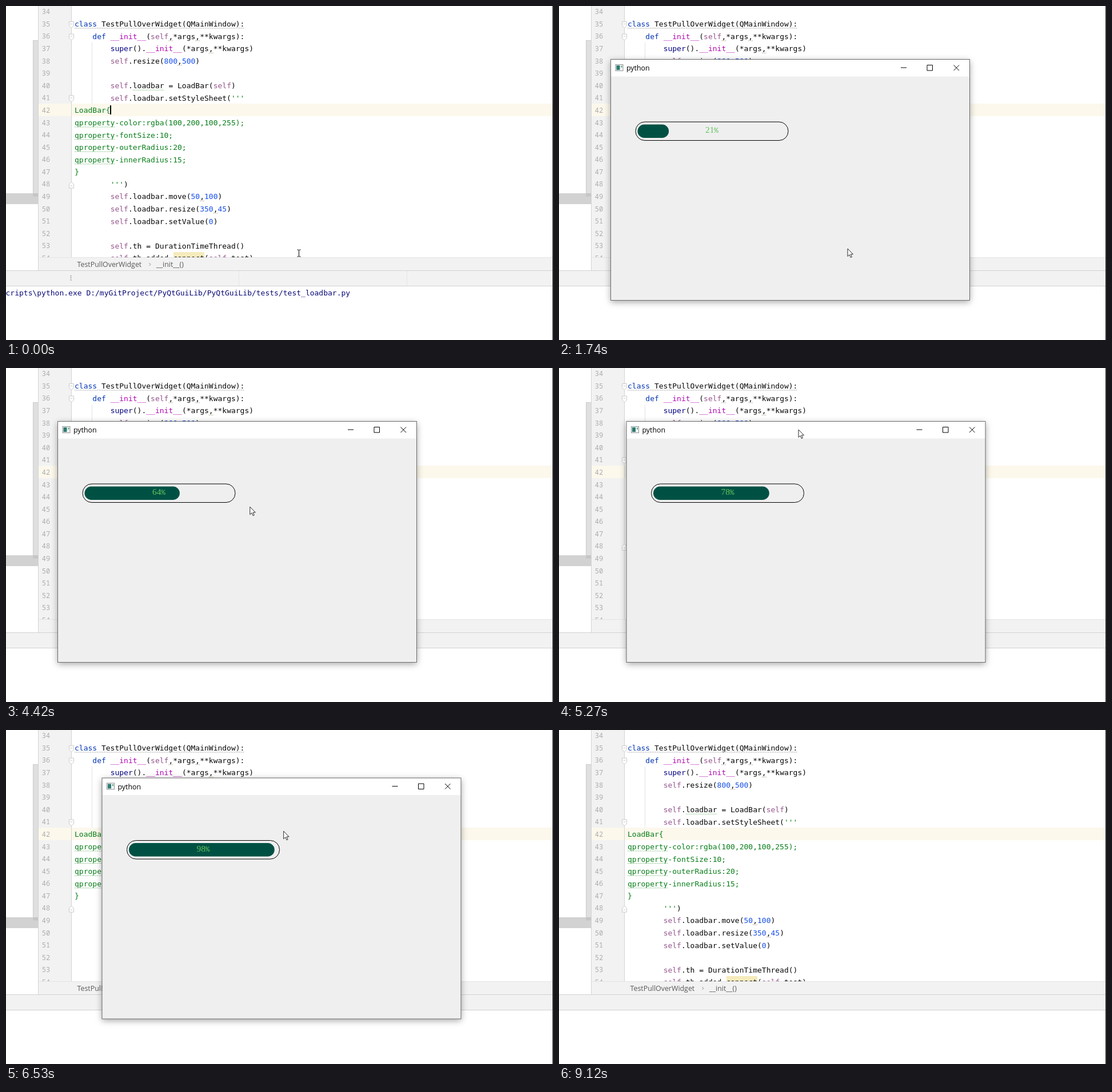
An HTML page for the animation above (9.36 s loop, 957 by 585 pixels).

```html
<!DOCTYPE html>
<html lang="en">
<head>
<meta charset="utf-8">
<title>Load bar</title>
<style>
  html, body { margin: 0; width: 100%; height: 100%; overflow: hidden; background: #fff; }
  svg { display: block; width: 957px; height: 585px; }
  text { white-space: pre; }
  .mono { font: 13px "DejaVu Sans Mono", monospace; font-variant-ligatures: none; fill: #080808; }
  .ui { font: 12.4px "Open Sans", sans-serif; }
  .number { font: 12px "Noto Sans Mono", monospace; fill: #adadad; }
  .key { fill: #0033b3; }
  .magic { fill: #b200b2; }
  .builtin { fill: #000080; }
  .self { fill: #94558d; }
  .digit { fill: #1750eb; }
  .string { fill: #067d17; }
  .line { fill: none; stroke: #000; }
  #percent { font: 15.4px "Liberation Serif", serif; fill: #64c45c; text-anchor: middle; }
  #percent .sign { font: 12.8px "Liberation Mono", monospace; }
  #shell { filter: drop-shadow(0 3px 6px rgba(0, 0, 0, .36)); }
</style>
</head>
<body>
<svg viewBox="0 0 957 585">
  <rect width="957" height="585" fill="#fff"/>
  <rect y="328" width="56" height="19" fill="#d2d2d2"/>
  <rect x="47.5" y="60.5" width="9" height="273" fill="#b4b4b4" fill-opacity=".42" stroke="#cbcbcb"/>
  <rect x="57" width="57" height="440" fill="#f2f2f2"/>
  <rect x="57" y="171" width="899" height="22" fill="#fcf8ec"/>
  <path d="M56.5 0V463M114.5 0V440" stroke="#d4d4d4"/>
  <path d="M150.5 64V171" stroke="#e4e4e4"/>
  <rect x="293" y="431" width="54" height="12" fill="#f6ebbc"/>
  <g id="code"></g>
  <path id="caret" d="M183 174V190" stroke="#000" stroke-width="2"/>

  <rect x="57" y="440" width="900" height="23" fill="#f2f2f2"/>
  <path d="M57 440.5H957" stroke="#e4e4e4"/>
  <rect y="464" width="957" height="26" fill="#f2f2f2"/>
  <path d="M0 463.5H957M0 490.5H957" stroke="#d1d1d1"/>
  <g class="ui" fill="#595959">
    <text x="124.500" y="456.500">TestPullOverWidget</text>
    <text x="263" y="456.500">__init__()</text>
    <path d="M250.500 450l2.500 2.500-2.500 2.500" class="line" style="stroke:#8c8c8c"/>
  </g>
  <g id="console">
    <path d="M407.500 464V490M701.500 464V490" stroke="#e6e6e6"/>
    <path d="M113.500 472V481" stroke="#6e6e6e" stroke-width="1.500" stroke-dasharray="1.500 2"/>
    <text class="mono" x="-.500" y="507" style="fill:#0a0a78">cripts\python.exe D:/myGitProject/PyQtGuiLib/PyQtGuiLib/tests/test_loadbar.py</text>
  </g>
  <path d="M956.500 0V585" stroke="#333"/>

  <g id="window">
    <rect id="shell" width="628" height="422" fill="#efefef"/>
    <rect width="628" height="30" fill="#fff"/>
    <rect id="hover" x="582" width="46" height="30" fill="#e81123"/>
    <rect width="628" height="422" class="line" style="stroke:#6c6c6c"/>
    <rect x="8.500" y="9" width="13" height="11" fill="#f4f6f6" stroke="#8b9296"/>
    <rect x="10" y="10.500" width="6" height="8" fill="#2d7a70"/>
    <rect x="18" y="11" width="2" height="3" fill="#5aa06e"/>
    <text class="ui" x="27.500" y="19.500">python</text>
    <path class="line" d="M507.500 14.500h10M553.500 10h9.500v9.500h-9.500z"/>
    <path class="line" id="cross" d="M600 10l9.500 9.500m0-9.500l-9.500 9.500"/>
    <rect class="line" x="43.500" y="109.500" width="267" height="32.500" rx="16"/>
    <rect id="fill" x="47" y="114" height="23.500" rx="11.700" fill="#005144"/>
    <text id="percent" x="177" y="128.500"><tspan id="value"></tspan><tspan class="sign">%</tspan></text>
  </g>

  <path id="arrow" d="M0 0V13.500L3.200 10.600L5.300 15.500L7.400 14.600L5.300 9.800H9.500Z" fill="#fff" stroke="#111" stroke-width=".9"/>
  <path id="beam" class="line" d="M509.500 427h2l1 1 1-1h2M512.500 428V438M509.500 439h2l1-1 1 1h2"/>
</svg>

<script>
const LOOP = 9360, FIRST_LINE = 34, PITCH = 21.58, CHAR = 7.827, LEFT = 120;
const OPEN = 360, CLOSE = 8260;
const $ = id => document.getElementById(id);

const lines = `
class TestPullOverWidget(QMainWindow):
    def __init__(self,*args,**kwargs):
        super().__init__(*args,**kwargs)
        self.resize(800,500)

        self.loadbar = LoadBar(self)
        self.loadbar.setStyleSheet('''
LoadBar{
qproperty-color:rgba(100,200,100,255);
qproperty-fontSize:10;
qproperty-outerRadius:20;
qproperty-innerRadius:15;
}
        ''')
        self.loadbar.move(50,100)
        self.loadbar.resize(350,45)
        self.loadbar.setValue(0)

        self.th = DurationTimeThread()
        self.th.added.connect(self.test)`.split("\n");

const tokenClass = token =>
  /class|def/.test(token) ? "key" : token === "__init__" ? "magic" :
  token === "super" ? "builtin" : token === "self" ? "self" :
  token === "'''" ? "string" : "digit";

const highlight = line => line.replace(/\b(class|def|super|self|__init__)\b|\d+|'''/g,
  token => `<tspan class="${tokenClass(token)}">${token}</tspan>`);

const underline = (column, length, y, color) =>
  `<path d="M${LEFT + column * CHAR} ${y}h${length * CHAR}" stroke="${color}" stroke-dasharray="2 1"/>`;

function foldMark(line, flip) {
  const y = 33 + (line - 35) * PITCH;
  return `<g transform="translate(114.5 ${y}) scale(1 ${flip})" fill="#fff" stroke="#cacaca">
    <path d="M-4-5.500H4V1.500L0 5.500L-4 1.500Z"/><path d="M-2-1.500H2"/></g>`;
}

function codeMarkup() {
  let markup = "";
  lines.forEach((line, i) => {
    const number = FIRST_LINE + i, y = 14.7 + i * PITCH;
    const inString = number >= 42 && number <= 47;
    markup += `<text class="number" x="62.700" y="${y - .4}">${number}</text>`;
    markup += `<text class="mono" x="${LEFT}" y="${y}">${
      inString ? `<tspan class="string">${line}</tspan>` : highlight(line)}</text>`;
    if (line.startsWith("class")) markup += underline(0, line.length, y + 2.5, "#aaa");
    if (line.startsWith("qproperty")) markup += underline(0, 9, y + 3, "#8fc48f");
    if (line.includes("loadbar =")) markup += underline(13, 7, y + 3, "#8fc48f");
    if (!inString) for (const comma of line.matchAll(/,/g))
      markup += underline(comma.index, 1, y + 3, "#b5ad98");
  });
  return markup + [35, 36, 41].map(n => foldMark(n, 1)).join("") + foldMark(48, -1);
}
$("code").innerHTML = codeMarkup();

// Paths are [time, x, y] stops joined with eased moves.
const pointerPath = [
  [0, 508, 427], [1000, 508, 427], [1600, 505, 425], [2300, 505, 425], [2800, 492, 432],
  [3920, 492, 432], [4800, 384, 119], [4960, 384, 108], [5270, 419, 108],
  [5680, 470, 98.5], [5950, 440, 98.5], [6250, 458, 98.5], [6400, 458, 98.5],
  [6760, 550, 360], [7020, 610, 470], [7350, 780, 370], [7700, 768, 165],
  [7780, 765, 134], [7960, 772, 98], [8280, 772, 98], [8620, 920, 588]
];
const windowPath = [
  [0, 90.5, 93.5], [4960, 90.5, 93.5], [5270, 118, 93.5], [5680, 180, 84],
  [5950, 150, 84], [6250, 168, 84]
];

const clamp = (value, low = 0, high = 1) => Math.min(high, Math.max(low, value));

function along(path, t) {
  const next = path.findIndex(stop => stop[0] > t);
  if (next < 0) return path.at(-1).slice(1);
  const [t0, x0, y0] = path[next - 1], [t1, x1, y1] = path[next];
  const u = (t - t0) / (t1 - t0), k = u * u * (3 - 2 * u);
  return [x0 + (x1 - x0) * k, y0 + (y1 - y0) * k];
}

const show = (id, visible) => $(id).setAttribute("visibility", visible ? "visible" : "hidden");

function draw(t) {
  const percent = Math.floor(clamp((t - 420) / 61.8, 0, 100));
  $("fill").setAttribute("width", percent * 2.6);
  $("value").textContent = percent;

  const [x, y] = along(windowPath, t);
  const presence = clamp((t - OPEN) / 160) * clamp((CLOSE + 140 - t) / 140);
  const scale = .92 + .08 * presence;
  $("window").setAttribute("opacity", presence);
  $("window").setAttribute("transform",
    `translate(${x + 314 * (1 - scale)} ${y + 211 * (1 - scale)}) scale(${scale})`);

  const hovering = t > 7910;
  $("hover").setAttribute("opacity", clamp((t - 7890) / 80));
  $("cross").style.stroke = hovering ? "#fff" : "#000";

  const [px, py] = along(pointerPath, t);
  $("arrow").setAttribute("transform", `translate(${px} ${py})`);
  show("arrow", t > OPEN && t < 8640);
  show("beam", t <= OPEN);
  show("caret", t < 8760);
  show("console", t < 120);
}

function tick() {
  draw(performance.now() % LOOP);
  requestAnimationFrame(tick);
}
tick();
</script>
</body>
</html>
```
